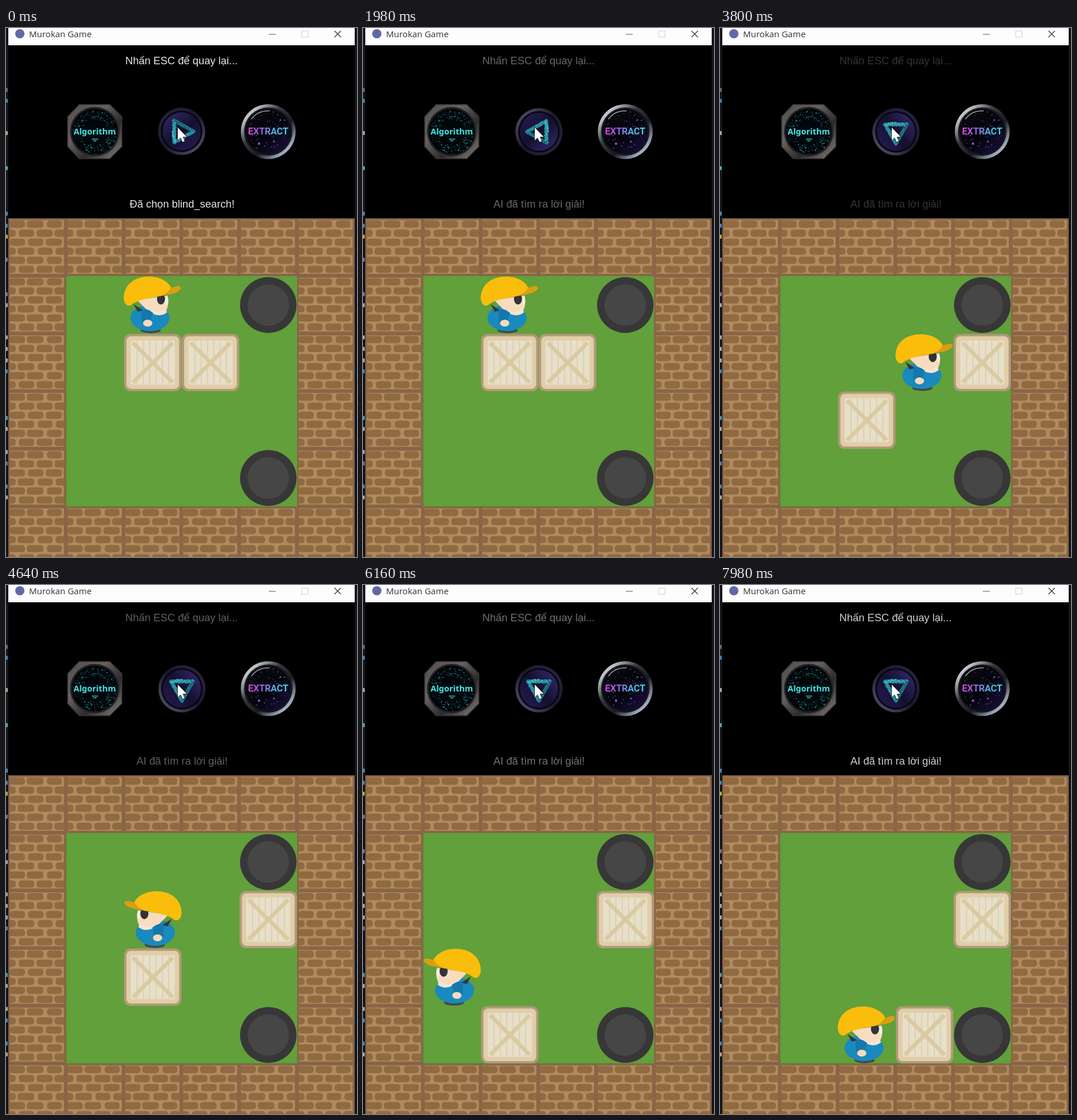
Animation of 609x919 px, one loop 8000 ms. Source, as an HTML page with a canvas:

```html
<!DOCTYPE html>
<html lang="vi">
<head>
<meta charset="utf-8">
<title>Murokan Game</title>
<style>
html, body { margin: 0; width: 100%; height: 100%; overflow: hidden; background: #14171a; }
canvas { display: block; }
</style>
</head>
<body>
<canvas id="stage" width="609" height="919"></canvas>
<script>
const LOOP = 8000, FADE = 2700;
const FIRST_MOVE = 2130, MOVE_TIME = 900, MOVES = 'DRLDLDR';
const DIRS = { D: [0, 1], R: [1, 0], L: [-1, 0] };
const TILE = 100.2, LEFT = 4, TOP = 330.5;
const stage = document.getElementById('stage');
let c = stage.getContext('2d');

function randomizer(seed) {
  return () => (seed = (seed * 16807) % 2147483647) / 2147483647;
}

function rect(x, y, w, h, color, radius = 0) {
  c.fillStyle = color;
  c.beginPath();
  c.roundRect(x, y, w, h, radius);
  c.fill();
}

function oval(x, y, rx, ry, color, angle = 0) {
  c.fillStyle = color;
  c.beginPath();
  c.ellipse(x, y, rx, ry, angle, 0, Math.PI * 2);
  c.fill();
}

const disc = (x, y, r, color) => oval(x, y, r, r, color);

function shape(d, color) {
  c.fillStyle = color;
  c.fill(new Path2D(d));
}

function lines(d, color, width) {
  c.strokeStyle = color;
  c.lineWidth = width;
  c.stroke(new Path2D(d));
}

function label(text, x, y, font, color, align = 'center') {
  c.font = font;
  c.textAlign = align;
  c.fillStyle = color;
  c.fillText(text, x, y);
}

function gradient(x0, y0, x1, y1, ...colors) {
  const g = c.createLinearGradient(x0, y0, x1, y1);
  colors.forEach((color, i) => g.addColorStop(i / (colors.length - 1), color));
  return g;
}

function at(x, y, draw) {
  c.save();
  c.translate(x, y);
  draw();
  c.restore();
}

const onTile = (col, row, draw) => at(LEFT + col * TILE, TOP + row * TILE, draw);

function drawWall() {
  c.beginPath();
  c.rect(0, 0, TILE, TILE);
  c.clip();
  rect(0, 0, TILE, TILE, '#b18a60');
  for (let row = 0; row < 6; row++) {
    for (let i = -1; i < 4; i++) {
      const wobble = (row * 5 + i * 3 + 9) % 4;
      rect(i * 32 + (row % 2) * 16 + wobble, 4 + row * 15.7, 29 - wobble, 12.5, '#906b42', 5);
    }
  }
  lines('M0 1H101M1 0V101M0 98.5H101M98.5 0V101', '#8a6547', 4);
}

function drawGoal() {
  oval(50.3, 50.5, 49, 48.5, '#373737');
  disc(50.3, 50.5, 36, '#464646');
}

function drawCrate() {
  rect(0.5, 0.5, 99.5, 99.5, '#b19a7b', 11);
  rect(4.5, 4.5, 91.5, 91.5, '#e1cea9', 8);
  rect(12, 12, 76.5, 76.5, '#e7dfc8', 3);
  lines('M23 12V88M34 12V88M45 12V88M56 12V88M67 12V88M78 12V88', '#d7ccb4', 1.5);
  lines('M16 16L85 85M85 16L16 85', '#dacaa1', 7);
}

function drawSidePlayer() {
  oval(46.5, 94.5, 17.5, 5, '#46464a');
  oval(45.5, 73, 34, 23, '#198abd');
  shape('M17 49L34 60L24 62Z', '#34383d');
  shape('M23 42L76 34Q80 52 71 64Q53 68 38 57Z', '#f8dcc0');
  oval(64.5, 40, 7, 9.5, '#343239');
  oval(74.5, 43, 2.5, 7, '#f4eee5');
  shape('M31 60Q43 55 50 65L45 83L31 80Z', '#1478aa');
  shape('M49 59Q59 67 72 57L75 63Q65 72 51 66Z', '#f5e4d4');
  oval(41.5, 82, 8, 6, '#f8d9bd');
  shape('M0 41C-1 14 20 1 44 1C63 1 78 10 83 22L91 18Q99 17 99 22Q94 30 77 32C54 38 26 39 12 51Q3 54 0 41Z', '#fbbd0b');
  shape('M81 21L91 18Q99 17 99 22Q94 30 77 32L65 34Q78 29 81 21Z', '#db9d12');
}

function drawFrontPlayer() {
  oval(38, 91.5, 11.5, 6, '#444349');
  oval(64, 94.5, 12, 6, '#444349');
  shape('M2 77Q5 63 23 61H77Q95 63 99 79L84 84Q74 91 50 91Q27 91 17 84Z', '#198abd');
  oval(8, 82, 8, 6, '#f8dcc4');
  oval(93, 82, 8, 6, '#f8dcc4');
  oval(50, 53, 37, 21, '#f9dfc8');
  shape('M28 67Q50 78 73 67L66 75Q50 80 34 75Z', '#f2cfb1');
  for (const x of [35.5, 64.5]) {
    oval(x, 47, 8.5, 11, '#34333a');
    oval(x + (x < 50 ? -6 : 6), 47, 2, 8, '#f4eee8');
  }
  shape('M2 42C1 15 22 1 50 1S99 15 98 42Q96 49 88 50Q75 39 50 39T12 50Q3 49 2 42Z', '#f9bd0b');
  shape('M2 36Q22 29 50 31T98 36V42Q96 49 88 50Q75 39 50 39T12 50Q3 49 2 42Z', '#dba413');
  shape('M40 2Q50 -1 60 2L65 35Q50 37 35 35Z', '#fdca32');
}

function drawPlayer(facing) {
  if (facing === 'D') return drawFrontPlayer();
  if (facing === 'L') {
    c.translate(TILE, 0);
    c.scale(-1, 1);
  }
  drawSidePlayer();
}

function drawAlgorithmButton() {
  const random = randomizer(41);
  const octagon = 'M-27 -47H26L47 -26V26L26 47H-27L-47 26V-26Z';
  shape(octagon, gradient(-40, -40, 40, 40, '#55514f', '#67615e', '#2c2b2c', '#77716d'));
  lines(octagon, '#383635', 1.5);
  disc(0, 0, 43, '#232326');
  disc(0, 0, 40, '#030609');
  for (let i = 0; i < 230; i++) {
    const angle = random() * Math.PI * 2, r = 22 + random() * 16, size = 0.7 + random() * 1.3;
    rect(Math.cos(angle) * r, Math.sin(angle) * r, size, size, ['#176b75', '#209eaa', '#164451'][i % 3]);
  }
  rect(-36, -8, 72, 18, '#030a0e', 5);
  label('Algorithm', 0, 5, 'bold 14.5px "Noto Sans", sans-serif', '#45e4e6');
  lines('M-5 13H6M-3 16H3', '#35bfc7', 1.5);
}

function drawPlayButton(turn) {
  const random = randomizer(77);
  c.rotate(-turn * Math.PI / 2);
  disc(0, 0, 41, gradient(-30, -30, 30, 30, '#25243d', '#19172b', '#4a4960'));
  disc(0, 0, 36, '#08070f');
  disc(0, 0, 33, gradient(-20, -25, 20, 25, '#2c2360', '#14102d', '#20194b'));
  c.lineJoin = 'round';
  lines('M-13 -19V19L21 0Z', '#238391', 6);
  for (let i = 0; i < 190; i++) {
    const u = random(), side = i % 3, spread = (random() - 0.5) * 7;
    const x = side ? -13 + 34 * u : -13 + spread;
    const y = side ? (side === 1 ? -1 : 1) * 19 * (1 - u) + spread : -19 + 38 * u;
    rect(x - 0.7, y - 0.7, 1.4, 1.4, ['#43c7d0', '#185163', '#2ea4b1'][i % 3]);
  }
}

function drawExtractButton() {
  const random = randomizer(19);
  disc(0, 0, 47.5, gradient(-32, -32, 32, 32, '#c4c8ca', '#35383d', '#191b20', '#a5afc3'));
  disc(0, 0, 42, '#15171e');
  disc(0, 0, 39, gradient(-25, -25, 25, 25, '#07090d', '#030408', '#130c2e'));
  c.lineCap = 'round';
  lines('M-29 -22Q-18 -37 2 -36', '#9da4a9', 1.5);
  for (let i = 0; i < 65; i++) {
    const angle = random() * 6.3, r = Math.sqrt(random()) * 36, size = 0.6 + random() * 1.4;
    rect(Math.cos(angle) * r, Math.sin(angle) * r, size, size, ['#5a2d8e', '#315887', '#8f36ad'][i % 3]);
  }
  disc(-16, 21, 2, '#b949dc');
  disc(10, 17, 1.6, '#8c4bd4');
  disc(21, -20, 1.4, '#4f7bc0');
  label('EXTRACT', 0, 5, 'bold 16px Roboto, sans-serif',
    gradient(-32, 0, 32, 0, '#d342dc', '#9862e4', '#4eaee0', '#4bd2e6'));
}

function drawWindow() {
  rect(0, 0, 609, 919, '#14171a');
  const marks = [[108, '#667'], [127, '#3287bd'], [183, '#aaa'], [244, '#49aeb5'], [323, '#4586b8'],
    [344, '#4586b8'], [363, '#c4ad32'], [403, '#9866a0'], [463, '#9866a0'], [482, '#aaa'], [538, '#aaa'],
    [558, '#aaa'], [578, '#aaa'], [597, '#4586b8'], [678, '#499bb8'], [697, '#aaa'], [737, '#aaa'],
    [757, '#4586b8'], [797, '#4586b8'], [816, '#aaa']];
  for (const [y, color] of marks) rect(0, y - 4, 3, 7, color, 1);

  rect(4, 0, 601, 30, '#fdfdfd');
  disc(24, 10, 8, '#6268a5');
  label('Murokan Game', 40, 16, '15px "Open Sans", sans-serif', '#333', 'left');
  lines('M456 11H468', '#555', 1);
  lines('M513 5H524V16H513Z', '#ccc', 1);
  lines('M570 5L581 16M581 5L570 16', '#333', 1.3);

  rect(4, 30, 601, 300.5, '#000');
  at(154, 180, drawAlgorithmButton);
  at(455, 180, drawExtractButton);

  c.save();
  c.beginPath();
  c.rect(4, TOP, 601, 589);
  c.clip();
  for (let row = 0; row < 6; row++) {
    for (let col = 0; col < 6; col++) {
      if (row % 5 === 0 || col % 5 === 0) onTile(col, row, drawWall);
    }
  }
  c.restore();
  rect(LEFT + TILE, TOP + TILE, TILE * 4, TILE * 4, '#61a03a');
  onTile(4, 1, drawGoal);
  onTile(4, 4, drawGoal);
}

function boardAfter(count) {
  const player = [2, 1], crates = [[2, 2], [3, 2]];
  let facing = 'R';
  for (facing of MOVES.slice(0, count)) {
    const [dx, dy] = DIRS[facing];
    player[0] += dx;
    player[1] += dy;
    const pushed = crates.find(([x, y]) => x === player[0] && y === player[1]);
    if (pushed) {
      pushed[0] += dx;
      pushed[1] += dy;
    }
  }
  return { player, crates, facing: count ? facing : 'R' };
}

// The unchanging window is painted once and reused.
const backdrop = document.createElement('canvas');
backdrop.width = stage.width;
backdrop.height = stage.height;
const screen = c;
c = backdrop.getContext('2d');
drawWindow();
c = screen;

function render(t) {
  c.drawImage(backdrop, 0, 0);

  const glow = Math.abs(1 - 2 * ((t + FADE - 50) % FADE) / FADE);
  const color = `rgba(238, 238, 238, ${glow})`;
  const font = '18.3px "Liberation Sans", Arial, sans-serif';
  label('Nhấn ESC để quay lại...', 304.5, 62.5, font, color);
  label(t < 1080 ? 'Đã chọn blind_search!' : 'AI đã tìm ra lời giải!', 305.5, 311.5, font, color);

  const turn = t < 1080 ? 0 : t < 1700 ? 1 : t < FIRST_MOVE ? 2 : 3;
  at(turn ? 305.3 : 304.7, turn ? 180.3 : 179.6, () => drawPlayButton(turn));
  at(298, 173, () => {
    const arrow = 'M0 0V22L5 17.5L8.5 25L12 23.5L8.8 16H15.5Z';
    lines(arrow, '#111', 1.5);
    shape(arrow, '#fff');
  });

  const count = Math.max(0, Math.min(MOVES.length, Math.floor((t - FIRST_MOVE) / MOVE_TIME) + 1));
  const { player, crates, facing } = boardAfter(count);
  for (const [col, row] of crates) onTile(col, row, drawCrate);
  onTile(...player, () => drawPlayer(facing));
}

const start = performance.now();
function tick() {
  render((performance.now() - start) % LOOP);
  requestAnimationFrame(tick);
}
tick();
</script>
</body>
</html>
```
